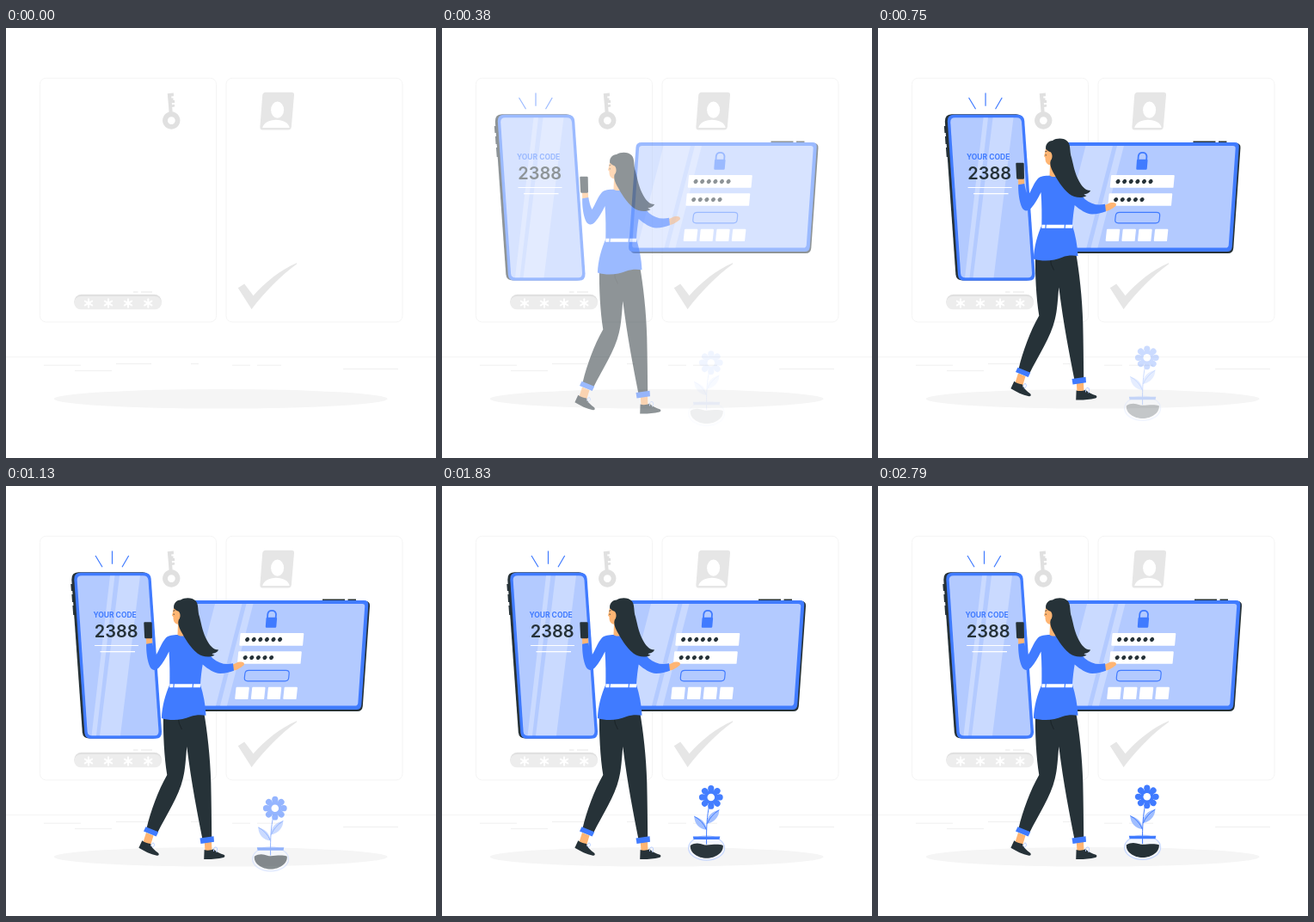
These frames come from a looping animation (500 px wide and 500 px high, 2830 ms). An HTML page:

```html
<!DOCTYPE html>
<html lang="en">
<head>
<meta charset="utf-8">
<title>Verification code</title>
<style>
html, body { margin: 0; width: 100%; height: 100%; overflow: hidden; background: #fff; }
svg { display: block; width: 100vw; height: 100vh; }
text { font-family: Inter, "Open Sans", sans-serif; text-anchor: middle; }
.blue { fill: #407bff; }
.dark { fill: #263238; }
.skin { fill: #ffb573; }
.pale { fill: #b3caff; }
.white { fill: #fff; }
.shine { fill: #fff; opacity: .3; }
.line { fill: none; stroke: #407bff; stroke-width: 1.2; }
.rule { fill: none; stroke: #fff; stroke-width: 1.2; }
</style>
</head>
<body>
<svg viewBox="0 0 500 500">
  <g id="backdrop">
    <g fill="none" stroke="#f2f2f2" stroke-width=".8">
      <rect x="39.5" y="58.3" width="205" height="283.6" rx="7"/>
      <rect x="256" y="58.3" width="205" height="283.6" rx="7"/>
      <path d="M0 382.4H500"/>
      <path stroke="#ebebeb" d="M44 392.2H87M80 398.6H123M128 390.5H169M215 390.5H224M263 392.2H284M292 392.2H320M392 396.5H456"/>
    </g>
    <ellipse cx="249.7" cy="431.3" rx="193.9" ry="11.3" fill="#f5f5f5"/>
    <g fill="#e0e0e0">
      <path fill-rule="evenodd" d="M192.3 97.3A10.2 10.2 0 1 1 192.2 97.3ZM192.3 103.2A4.4 4.4 0 1 0 192.4 103.2Z"/>
      <path d="M187.8 76.2L194.8 75.6L195.1 79.3L192.2 79.6L192.4 81.6L194.4 81.5L194.6 84L196 84L196.2 87L192.8 87.3L193 89.3L196 89.1L196.2 91.6L193.2 91.9L193.7 98.5L189.7 98.8Z"/>
    </g>
    <path fill="#e6e6e6" d="M302 74.8H332Q335.2 74.8 335 78L331.9 114.5Q331.5 118.4 328 118.4H298.3Q295.2 118.4 295.4 115L298.2 78.5Q298.6 74.8 302 74.8Z"/>
    <ellipse class="white" cx="315.6" cy="95.2" rx="7.5" ry="9.6"/>
    <path class="white" d="M298.2 116C299.5 110.5 306 106.8 314 106.8S328.8 110.5 329.7 116Z"/>
    <path fill="#e6e6e6" d="M269.8 302.3L277.2 297.6L287.6 311.3C301 296 319 281.5 338 273.3L338.3 274.2C319 288.5 301.500 306 285.600 327Z"/>
    <rect x="79.3" y="309.8" width="101.6" height="17" rx="8.5" fill="#e0e0e0"/>
    <rect x="79.3" y="312" width="101.6" height="15.2" rx="7.6" fill="#ededed"/>
    <path fill="none" stroke="#e6e6e6" d="M148 307H153.500M157 307H170"/>
    <g id="stars" stroke="#fff" stroke-width="2" stroke-linecap="round"></g>
  </g>

  <g id="phone">
    <path class="line" d="M104 81L112 94.2M123.500 75.500V90.700M142.700 81L135 94.200"/>
    <path fill="none" stroke="#263238" stroke-width="2" d="M76.300 114L76.900 122M77.400 126L78 135M78.400 139L79.200 150"/>
    <path class="dark" d="M84 100.300H159Q166 100.300 166.600 107L178 287Q178 293.500 171 293.500H97Q89.500 293.500 88.800 286.500L76.300 109Q76 100.600 84 100.300Z"/>
    <path class="blue" d="M87 100.800H160.500Q168 100.800 168.700 108L181 285.500Q181.400 293.700 174 293.700H98.500Q92 293.700 91.400 287L79.300 108.500Q79 100.800 87 100.800Z"/>
    <path class="pale" d="M88 104.200H159.500Q165 104.200 165.500 109.500L177.500 285Q177.700 290.300 173 290.300H99.500Q95 290.300 94.600 285.500L82.700 109.500Q82.500 104.200 88 104.200Z"/>
    <path class="shine" d="M121 104.200H126.500L105 290.300H99.500ZM132 104.200H156L133 290.300H109Z"/>
    <text class="blue" x="126.600" y="153.200" font-size="8.500" font-weight="700">YOUR CODE</text>
    <text class="dark" x="128.200" y="176.400" font-size="20" font-weight="600">2388</text>
    <path class="rule" d="M103 185.500H154M109.500 192.600H150"/>
  </g>

  <g id="tablet">
    <path fill="none" stroke="#263238" stroke-width="1.600" d="M368 132.300H394M397.500 132.300H407"/>
    <path class="dark" d="M219 134H418Q423.400 134 423 139.500L414.800 256Q414.200 262 408.500 262H210Q204.500 262 205 256.500L213 139.500Q213.500 134 219 134Z"/>
    <path class="blue" d="M217.500 133H416.500Q421.700 133 421.300 138.500L413.300 254.500Q412.800 260 407.300 260H207.500Q202.200 260 202.600 254.500L211 138.500Q211.500 133 217.500 133Z"/>
    <path class="pale" d="M218 137H414.200Q417.400 137 417.200 140L409.300 252.500Q409 255.600 405.800 255.600H209.500Q206.500 255.600 206.700 252.500L214.600 140Q214.800 137 218 137Z"/>
    <path class="shine" d="M243 137H274.500L244 255.600H212.500ZM279.500 137H287.500L257 255.600H249Z"/>
    <path class="line" stroke-width="1.800" style="stroke-width:1.800" d="M304 153.500L304.300 149A4.900 4.900 0 0 1 314 149L313.700 153.500"/>
    <path class="blue" d="M303.800 152.700H313.800Q315.200 152.700 315.100 154L314.300 163.500Q314.200 164.800 312.900 164.800H303Q301.700 164.800 301.800 163.500L302.500 154Q302.600 152.700 303.800 152.700Z"/>
    <g id="fields"></g>
    <path class="line" d="M282.500 214.300H325.500Q329.500 214.300 329.200 218L328.700 223Q328.300 226.800 324.500 226.800H281Q277 226.800 277.300 223L277.900 218Q278.300 214.300 282.500 214.300Z"/>
  </g>

  <g id="plant">
    <ellipse cx="307.600" cy="420.300" rx="21" ry="14.200" fill="#f4f7ff" stroke="#c6d7ff" stroke-width="1.200"/>
    <path class="dark" d="M288.800 417.300C294 414 299 414.500 304 416.300S319 414.500 326.800 417.300C327.500 426 318 432 307.800 432S288 426 288.800 417.300Z"/>
    <path class="blue" d="M291.800 406.800H323.300L322.500 410.300H292.600Z"/>
    <path fill="#a0beff" d="M293.300 383.500C301 385 307.500 391 307.500 399C299.500 398.500 293.500 392 293.300 383.500ZM322.300 376C322.500 384 316 390.500 308.300 392C307.500 384 313.500 377.500 322.300 376Z"/>
    <path class="line" style="stroke-width:1" d="M310.700 371C308.300 383 307.300 394 307.600 416M322.300 376C316 380 311 385.500 308.300 392M293.300 383.500C300 387 304.500 392 307.500 399"/>
    <g id="petals" class="blue"></g>
    <circle class="blue" cx="312.800" cy="361.300" r="8"/>
    <circle class="white" cx="312.800" cy="361.300" r="4.300"/>
  </g>

  <g id="woman">
    <path class="skin" d="M163 403L171.500 406.500L168 418L159.500 414ZM230.800 414L239 413L239.500 425L231.500 425Z"/>
    <path class="dark" d="M158.300 412.300C161 414.500 164.500 415.800 168 416C169.500 421 173.500 424 177.300 427C178.300 428.500 177.500 430 175.500 429.700C168 428.300 161 424.500 154.400 420.700Z"/>
    <path class="dark" d="M230.600 423C234.500 424.300 238.500 423.500 241.500 422C244.500 426 249.500 427.300 253.300 428.800C255 429.800 254.700 431.600 252.800 432C245.500 433.700 237.500 434.300 230.200 434Z"/>
    <path fill="none" stroke="#b3caff" stroke-width=".9" d="M168.500 419Q170 413.500 172 415.500T170 421M241.500 425Q241 419.500 244 420T244.500 426"/>
    <path class="dark" d="M183 262H230C234 285 237.500 315 238.300 345C238.800 366 239 388 239.200 408.500L228.300 410C223 383 215.500 345 210.300 303C209 317 208.500 330 205.800 340C201 361 186 383 176 403.500L163.500 398C168.500 377 177 354 187.300 336C184 315 182.500 288 183 262Z"/>
    <path fill="none" stroke="#172024" stroke-width=".8" d="M200 268Q200.500 277 204.500 283"/>
    <path class="blue" d="M162.500 396.200L177.200 402.300L174.700 407.500L160 401.500ZM225.500 409.500L241.500 407.300L242 413.700L226.500 416Z"/>
    <path class="skin" d="M163 177C165 175.500 169 175.500 170 178L170.200 184.500H163.200ZM263.500 207.500C267 206.500 269.500 204 272.500 204.500C276 204.500 278 206 276.500 208.500C273.500 210.500 269.500 214 264.500 214.500Z"/>
    <path class="dark" d="M161.300 158.300H168.600Q169.700 158.300 169.700 159.400L170 176Q170 177.300 168.800 177.300H162.300Q161.200 177.300 161.100 176L160.300 159.500Q160.200 158.300 161.300 158.300Z"/>
    <path class="blue" d="M200 173C194 173.300 189 173.800 186 176.500C181 182 178.500 190 174.500 196.500C172.500 193 171 187 170.300 182.500L163.100 183.700C163 192 164 203 167.500 210.500C170 215 174.500 215 178 211C182.500 206 186 199.500 189.500 192.500C190.500 206 190.500 219 190.300 231C185 243 181.500 256 180.900 270C191 273.300 205 272.500 214 268.300C221 265.500 228 266 232.500 266.700C232 255 229.500 242 226 231C226.500 223 227.500 214 228.700 207.500C235 213 242 217.500 249 218C255 218 260 216.500 265 214.700L264 206.300C255 208.500 247 206 240.500 200.500C234 193 229 181 219 174.500Z"/>
    <path class="white" d="M190.500 230.200H226.200L226 234.200H190.200Z"/>
    <path class="line" d="M195.300 229.500L194.800 235M217.600 229.500L217 235"/>
    <path class="skin" d="M195 142C193.800 145 194.300 147.500 193 150.500L194.500 152.200C194.300 156 195.500 160 200 160.800L199.500 173C203 175.500 208 175 211 172L207 142Z"/>
    <path class="dark" d="M195.200 142.500C194.300 137 198 132.500 203 132.500C208 129 217 129.500 220.500 133.500C224.500 138 222.500 145 225 152C227.500 162 229 171 234 180C237 185.500 241 190.500 247.200 190.600C245.500 193.500 242.500 194.800 239.500 195C240.500 196 241.500 196.300 242.500 196.500C237.500 200 228 199 222.500 194.500C214 187.500 208 177 203.500 169C200.500 163.500 199.500 159 200.800 155.500C203.500 153 203 146.500 200 145.500C198 145 197 143.500 195.200 142.500Z"/>
    <path fill="none" stroke="#263238" stroke-width=".8" d="M194.300 145.300L196.500 144.700M195.200 148.500V150"/>
  </g>
</svg>
<script>
const LOOP = 2830, LEAD = 10, HOLD = 130;
const el = id => document.getElementById(id);

// Repeated parts
el("stars").innerHTML = [96, 119, 142, 165.3].map(x =>
  [90, 30, 150].map(a => {
    const dx = 4.8 * Math.cos(a * Math.PI / 180), dy = 4.8 * Math.sin(a * Math.PI / 180);
    return `<path d="M${x - dx} ${320 - dy}L${x + dx} ${320 + dy}"/>`;
  }).join("")).join("");

el("petals").innerHTML = Array.from({ length: 8 }, (_, i) =>
  `<ellipse cx="312.8" cy="351.3" rx="3.6" ry="3.9" transform="rotate(${i * 45} 312.8 361.3)"/>`).join("");

const slab = (x, y, w, h, lean) =>
  `<path fill="#fff" stroke="#fff" stroke-width="2" stroke-linejoin="round" d="M${x + 1} ${y + 1}h${w - 2}l${-lean} ${h - 2}h${2 - w}z"/>`;
const dots = (x, y, n) => Array.from({ length: n }, (_, i) =>
  `<ellipse class="dark" cx="${x + i * 7.6}" cy="${y}" rx="2.7" ry="2.3" transform="rotate(-40 ${x + i * 7.6} ${y})"/>`).join("");
el("fields").innerHTML =
  slab(272.5, 171, 73.800, 14.800, 1.200) + dots(280.600, 178.400, 6) +
  slab(270.200, 192.200, 73.600, 14.600, 1.200) + dots(278.200, 199.500, 5) +
  [0, 1, 2, 3].map(i => slab(267.500 + i * 18.700, 233.800, 15.300, 14.300, 1.300)).join("");

// Cubic curve with a soft overshoot
const bez = (u, a, b) => 3 * u * (1 - u) * (1 - u) * a + 3 * u * u * (1 - u) * b + u * u * u;
function ease(x) {
  if (x <= 0) return 0;
  if (x >= 1) return 1;
  let lo = 0, hi = 1;
  for (let i = 0; i < 30; i++) {
    const mid = (lo + hi) / 2;
    if (bez(mid, .36, .5) < x) lo = mid; else hi = mid;
  }
  return bez(lo, -.01, 1.38);
}

function enter(id, p, dx, dy) {
  const left = 1 - p, g = el(id);
  g.setAttribute("transform", `translate(${dx * left} ${dy * left})`);
  g.setAttribute("opacity", Math.max(0, Math.min(1, p)));
}

function draw(ms) {
  const t = ms % LOOP;
  const at = t < HOLD ? 0 : t + LEAD;
  const quick = ease(at / 1000);
  enter("phone", quick, -30, 0);
  enter("tablet", quick, 30, 0);
  enter("woman", quick, 0, 30);
  enter("plant", ease(at / 2800), 0, 30);
}

const start = performance.now();
function tick() {
  draw(performance.now() - start);
  requestAnimationFrame(tick);
}
draw(0);
requestAnimationFrame(tick);
</script>
</body>
</html>
```
